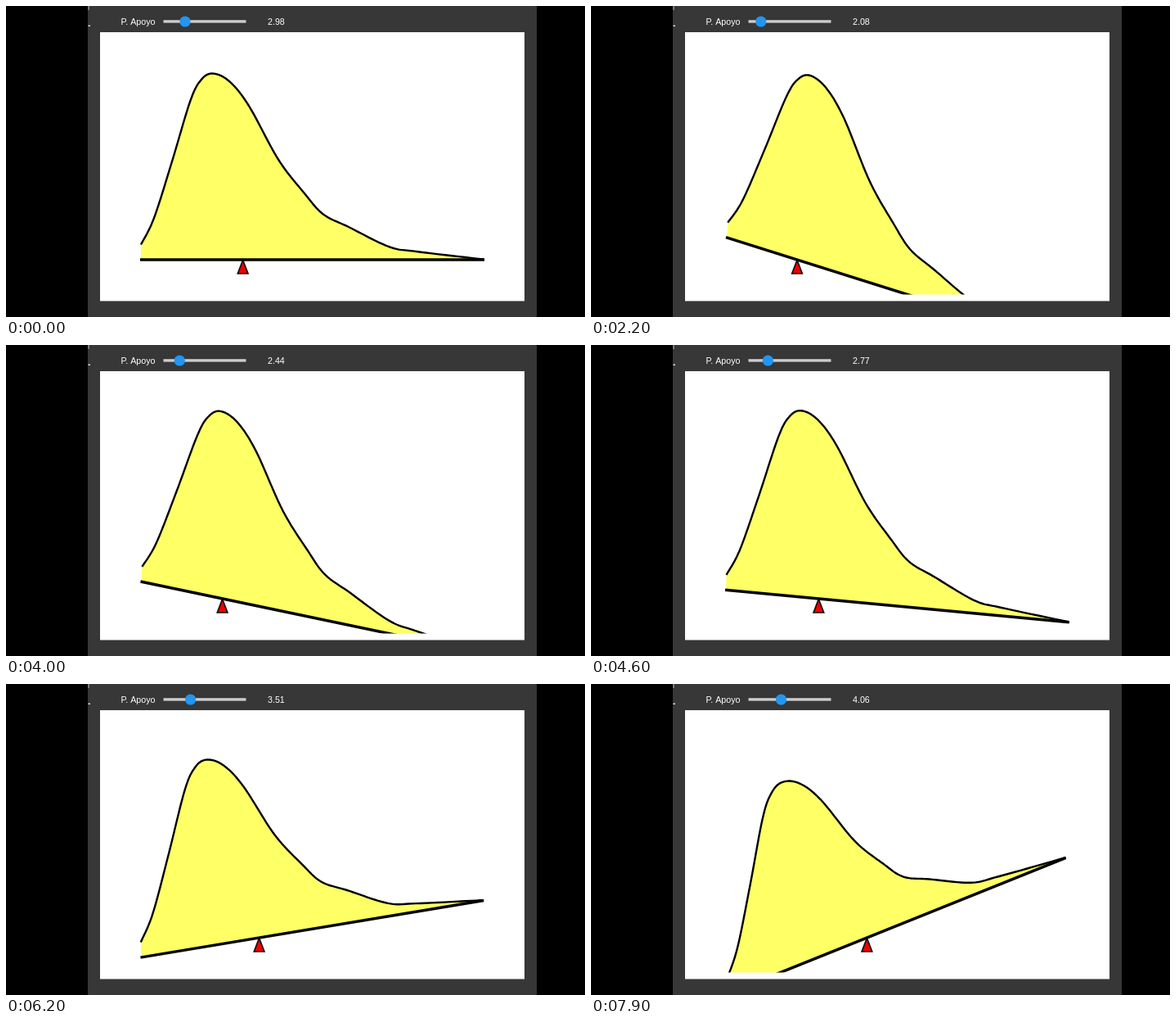
An HTML page with a canvas for the animation above (8 s loop, 708 by 380 pixels).

```html
<!DOCTYPE html>
<html lang="es">
<head>
<meta charset="utf-8">
<title>Punto de apoyo</title>
<style>
  html, body { margin: 0; width: 100%; height: 100%; overflow: hidden; background: #000; }
  canvas { display: block; }
</style>
</head>
<body>
<canvas id="stage" width="708" height="380"></canvas>
<script>
const ctx = document.getElementById('stage').getContext('2d');
const LOOP = 8000, STEP = 100;
const LEFT = 164, RIGHT = 585, BASE = 310, FLOOR = 352.5;
const UNIT = (RIGHT - LEFT) / 10;
const MEAN = 2.985;     // balance point
const TILT = 1 / 6;     // radians per unit off balance
const ASPECT = 2.1;     // vertical to horizontal scale of the plot

// support position every 800 ms, with one extra value at each end
const BEAT = 800;
const drag = [2.7, 2.985, 2.72, 2.22, 2.07, 2.04, 2.39, 2.82, 3.16, 3.56, 3.96, 4.06, 2.7];

const knots = [
  [165, 291.5], [181, 259], [203, 190], [225, 117], [238, 91], [252.5, 82.5],
  [273, 92], [297, 122], [333, 187.5], [365, 229], [388, 254.5], [419, 270],
  [468, 294], [502, 300], [585, 309.7]
];

// Catmull-Rom spline from b to c
function spline(a, b, c, d, u) {
  const cubic = 3 * (b - c) + d - a;
  const square = 2 * a - 5 * b + 4 * c - d;
  return b + 0.5 * u * (c - a + u * (square + u * cubic));
}

function valueAt(t) {
  const i = Math.min(Math.floor(t / BEAT), drag.length - 4);
  return spline(...drag.slice(i, i + 4), t / BEAT - i);
}

function smooth(pts, n) {
  const out = [], last = pts.length - 1;
  for (let i = 0; i < last; i++) {
    const near = [i - 1, i, i + 1, i + 2].map(k => pts[Math.max(0, Math.min(last, k))]);
    for (let j = 0; j < n; j++) {
      out.push([0, 1].map(axis => spline(...near.map(p => p[axis]), j / n)));
    }
  }
  out.push(pts[last]);
  return out;
}
const curve = smooth(knots, 12);

function trace(pts) {
  ctx.beginPath();
  pts.forEach(([x, y]) => ctx.lineTo(x, y));
}

function rect(color, x, y, w, h) {
  ctx.fillStyle = color;
  ctx.fillRect(x, y, w, h);
}

function drawSlider(v) {
  ctx.font = '10.7px "Liberation Sans", Arial, sans-serif';
  ctx.fillStyle = '#fff';
  ctx.fillText('P. Apoyo', 140.5, 22.5);
  ctx.fillText(v.toFixed(2), 320, 22.5);
  rect('#ccc', 192.5, 17.2, 101, 3.4);
  ctx.fillStyle = '#2196f3';
  ctx.beginPath();
  ctx.arc(181.75 + 12.5 * v, 19, 6.6, 0, 7);
  ctx.fill();
}

function drawPlot(v) {
  const px = LEFT + UNIT * v, angle = (MEAN - v) * TILT;
  const c = Math.cos(angle), s = Math.sin(angle);
  const turn = ([x, y]) => {
    const dx = x - px, h = BASE - y;
    return [px + c * dx + s * h / ASPECT, BASE - c * h + s * ASPECT * dx];
  };
  const top = curve.map(turn);
  const a = turn([LEFT, BASE]), b = turn([RIGHT, BASE]);

  trace([[px, 310.5], [px + 6.3, 327], [px - 6.3, 327]]);
  ctx.closePath();
  ctx.fillStyle = '#f00000';
  ctx.fill();
  ctx.strokeStyle = '#111';
  ctx.lineWidth = 1.7;
  ctx.stroke();

  ctx.save();
  ctx.beginPath();
  ctx.rect(115, 32, 519, FLOOR - 32);
  ctx.clip();
  trace([turn([165, BASE]), ...top, b]);
  ctx.fillStyle = '#ffff66';
  ctx.fill();
  ctx.strokeStyle = '#000';
  ctx.lineWidth = 2.4;
  ctx.lineJoin = 'round';
  trace(top);
  ctx.stroke();
  ctx.lineWidth = 3.5;
  trace([a, b]);
  ctx.stroke();
  ctx.restore();
}

function draw(t) {
  rect('#000', 0, 0, 708, 380);
  rect('#373737', 100, 0, 549, 380);
  rect('#bbb', 100.5, 0, 1, 5);
  rect('#ddd', 100.5, 23.5, 2.5, 1.5);
  rect('#fff', 115, 32, 519, 328.5);
  drawSlider(valueAt(Math.min(t + STEP, LOOP)));   // the label runs one step ahead
  drawPlot(valueAt(t));
}

const start = performance.now();
function frame(now) {
  const t = Math.max(0, now - start) % LOOP;
  draw(Math.floor(t / STEP) * STEP);
  requestAnimationFrame(frame);
}
draw(0);
requestAnimationFrame(frame);
</script>
</body>
</html>
```
